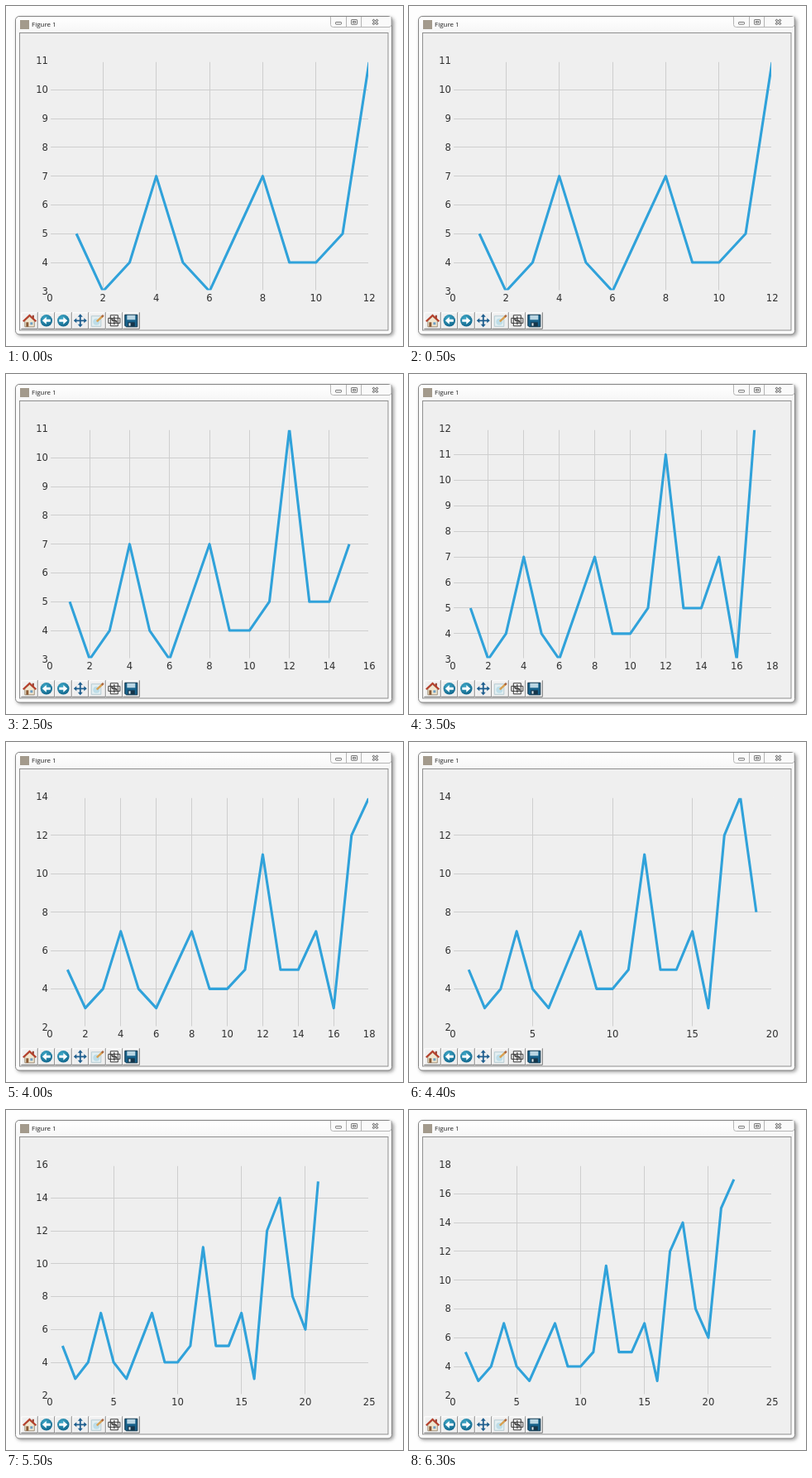
Animation, 480 px wide and 411 px high, one loop 6900 ms. Source, as an HTML page:

```html
<!DOCTYPE html>
<html lang="en">
<head>
<meta charset="utf-8">
<title>Live line chart</title>
<style>
  html, body { margin: 0; width: 100%; height: 100%; overflow: hidden; background: #fefefe; }
  svg { display: block; width: 480px; height: 411px; }
  .title { font: 8px "Open Sans", sans-serif; fill: #222; }
  #chart text { font: 11.6px "DejaVu Sans", sans-serif; fill: #303030; }
  #chart .grid { stroke: #cecece; fill: none; }
  #chart .data { stroke: #30a2da; stroke-width: 3.1; stroke-linejoin: round; fill: none; }
  #chart .spine { stroke: #efefef; stroke-width: 2.4; fill: none; }
</style>
</head>
<body>
<svg viewBox="0 0 480 411" xmlns="http://www.w3.org/2000/svg">
  <defs>
    <filter id="blur" x="-10%" y="-10%" width="120%" height="120%"><feGaussianBlur stdDeviation="2.2"/></filter>
    <clipPath id="plot"><rect x="52.9" y="66.5" width="386.3" height="278.3"/></clipPath>
    <linearGradient id="glass" x2="0" y2="1">
      <stop offset="0" stop-color="#fff"/><stop offset="1" stop-color="#f6f6f6"/>
    </linearGradient>
    <radialGradient id="ball" cx=".4" cy=".3" r=".8">
      <stop offset="0" stop-color="#3fa9c8"/><stop offset="1" stop-color="#0c5f86"/>
    </radialGradient>
  </defs>

  <!-- window -->
  <rect x="13" y="14" width="456" height="385" rx="5" fill="#777" opacity=".75" filter="url(#blur)"/>
  <rect x="11.5" y="12.5" width="455" height="384.5" rx="4.5" fill="#fcfcfc" stroke="#858585"/>
  <rect x="12.5" y="13.5" width="453" height="19" rx="3.5" fill="url(#glass)"/>
  <rect x="16.5" y="32.5" width="445.5" height="359.5" fill="#efefef" stroke="#8e8e8e"/>
  <rect x="17" y="17" width="11" height="11" fill="#a39a8c"/>
  <text class="title" x="31" y="25.3">Figure 1</text>

  <!-- caption buttons -->
  <g fill="none" stroke="#b4b4b4">
    <path d="M392.5 13V22.5Q392.5 25.5 395.5 25.5H463Q466 25.5 466 22.5V13M411.5 13V25M429.5 13V25" fill="#fafafa"/>
    <g stroke="#777">
      <rect x="398.5" y="19.5" width="7" height="2.6" rx=".6"/>
      <rect x="417.5" y="16.5" width="7" height="5.8" rx=".6"/>
      <rect x="419.5" y="18.5" width="3" height="1.8"/>
      <path d="M443.5 16.5L449.5 22.3M449.5 16.5L443.5 22.3" stroke-width="2.8"/>
      <path d="M444 17L449 21.8M449 17L444 21.8" stroke="#fff" stroke-width="1"/>
    </g>
  </g>

  <g id="toolbar"></g>
  <g id="chart"></g>
</svg>
<script>
const LOOP = 6900;
const LEFT = 52.9, RIGHT = 439.2, TOP = 66.5, BOTTOM = 344.8;
const values = [5, 3, 4, 7, 4, 3, 5, 7, 4, 4, 5, 11, 5, 5, 7, 3, 12, 14, 8, 6, 15, 17];
const FIRST_COUNT = 12;
// moments at which one more point arrives
const arrivals = [1200, 1700, 2300, 2900, 3400, 4000, 4400, 4900, 5400, 6000];

const chart = document.getElementById('chart');

function range(from, to, step) {
  const out = [];
  for (let v = from; v <= to; v += step) out.push(v);
  return out;
}

// tick spacing and limits grow with the data
function axesFor(count) {
  const peak = Math.max(...values.slice(0, count));
  const xStep = count > 18 ? 5 : 2;
  const yStep = peak > 12 ? 2 : 1;
  return {
    xStep, yStep,
    xMax: Math.ceil(count / xStep) * xStep,
    yMin: yStep === 2 ? 2 : 3,
    yMax: Math.ceil(peak / yStep) * yStep
  };
}

function drawChart(count) {
  const { xStep, yStep, xMax, yMin, yMax } = axesFor(count);
  const px = x => LEFT + x / xMax * (RIGHT - LEFT);
  const py = y => BOTTOM - (y - yMin) / (yMax - yMin) * (BOTTOM - TOP);
  const crisp = v => Math.floor(v) + 0.5;
  const xs = range(0, xMax, xStep), ys = range(yMin, yMax, yStep);

  const grid = xs.slice(1, -1).map(x => `M${crisp(px(x))} ${TOP}V${BOTTOM}`)
    .concat(ys.slice(1, -1).map(y => `M${LEFT} ${crisp(py(y))}H${RIGHT}`)).join('');
  const points = values.slice(0, count).map((v, i) => `${px(i + 1)},${py(v)}`).join(' ');
  const labels = xs.map(x => `<text x="${px(x)}" y="356.7" text-anchor="middle">${x}</text>`)
    .concat(ys.map(y => `<text x="51" y="${py(y) + 3.9}" text-anchor="end">${y}</text>`)).join('');

  chart.innerHTML = `<path class="grid" d="${grid}"/>
    <polyline class="data" clip-path="url(#plot)" points="${points}"/>
    <path class="spine" d="M${LEFT} ${TOP}H${RIGHT}V${BOTTOM}H${LEFT}Z"/>${labels}`;
}

// icons live in a 20 x 20 box
const ball = '<circle cx="10" cy="10" r="7.2" fill="url(#ball)"/>';
const arrow = '<path d="M5 10L10 5.6V8.5H15V11.5H10V14.4Z" fill="#fff"/>';
const icons = [
  `<path d="M4.5 10V17.5H16V10L10.2 5Z" fill="#f1e6cf" stroke="#8d7a62" stroke-width=".8"/>
   <path d="M13.5 3.5H15.5V8H13.5Z" fill="#8f3a2a"/>
   <path d="M2.5 11L10.2 3.6L18 11" fill="none" stroke="#b5402c" stroke-width="2.2"/>
   <path d="M6 12H9V17.5H6Z" fill="#8a5a35"/><path d="M11 12H14V15H11Z" fill="#6e9fc4"/>`,
  ball + arrow,
  ball + `<g transform="matrix(-1 0 0 1 20 0)">${arrow}</g>`,
  `<path d="M10 4V16M4 10H16" stroke="#1f5f8f" stroke-width="1.8"/>
   <path d="M10 2L13 5.5H7ZM10 18L13 14.5H7ZM2 10L5.5 7V13ZM18 10L14.5 7V13Z" fill="#1f5f8f"/>`,
  `<path d="M3 4.5H14.5V17H3Z" fill="#e4eff2" stroke="#a9c3cc" stroke-width=".8"/>
   <circle cx="9" cy="11.5" r="4" fill="#bddde8"/>
   <path d="M9.5 11L16.5 4.5" stroke="#d9a050" stroke-width="2.4"/>
   <path d="M15.5 5.5L17.5 3.5" stroke="#a9653f" stroke-width="2.4"/>`,
  `<path d="M5.5 3.5H14.5V16.5H5.5ZM3 7H17V13H3Z" fill="#fff" stroke="#333"/>
   <path d="M7 10H13M10 5V15" stroke="#444" stroke-width="1.4"/>
   <path d="M6.5 8.5H8.5M11.5 11.5H13.5" stroke="#222" stroke-width="1.6"/>`,
  `<path d="M2.5 3H17.5V17.5H4L2.5 16Z" fill="#17618a" stroke="#0d344b"/>
   <path d="M5 3.5H15V9H5Z" fill="#b9d5e2"/>
   <path d="M6 12H14.5V17H6Z" fill="#16364a"/><path d="M7.2 13H9.2V16.3H7.2Z" fill="#dde8ee"/>`
];

document.getElementById('toolbar').innerHTML = icons.map((icon, i) => `
  <g transform="translate(${18.3 + i * 20.5} 370.3)">
    <path d="M.5 20V.5H20" fill="none" stroke="#fff"/>
    <path d="M0 20H20V0" fill="none" stroke="#777"/>${icon}
  </g>`).join('');

let shown = 0;
const start = performance.now();

function tick() {
  const t = (performance.now() - start) % LOOP;
  const count = FIRST_COUNT + arrivals.filter(a => t >= a).length;
  if (count !== shown) drawChart(shown = count);
  requestAnimationFrame(tick);
}
tick();
</script>
</body>
</html>
```
